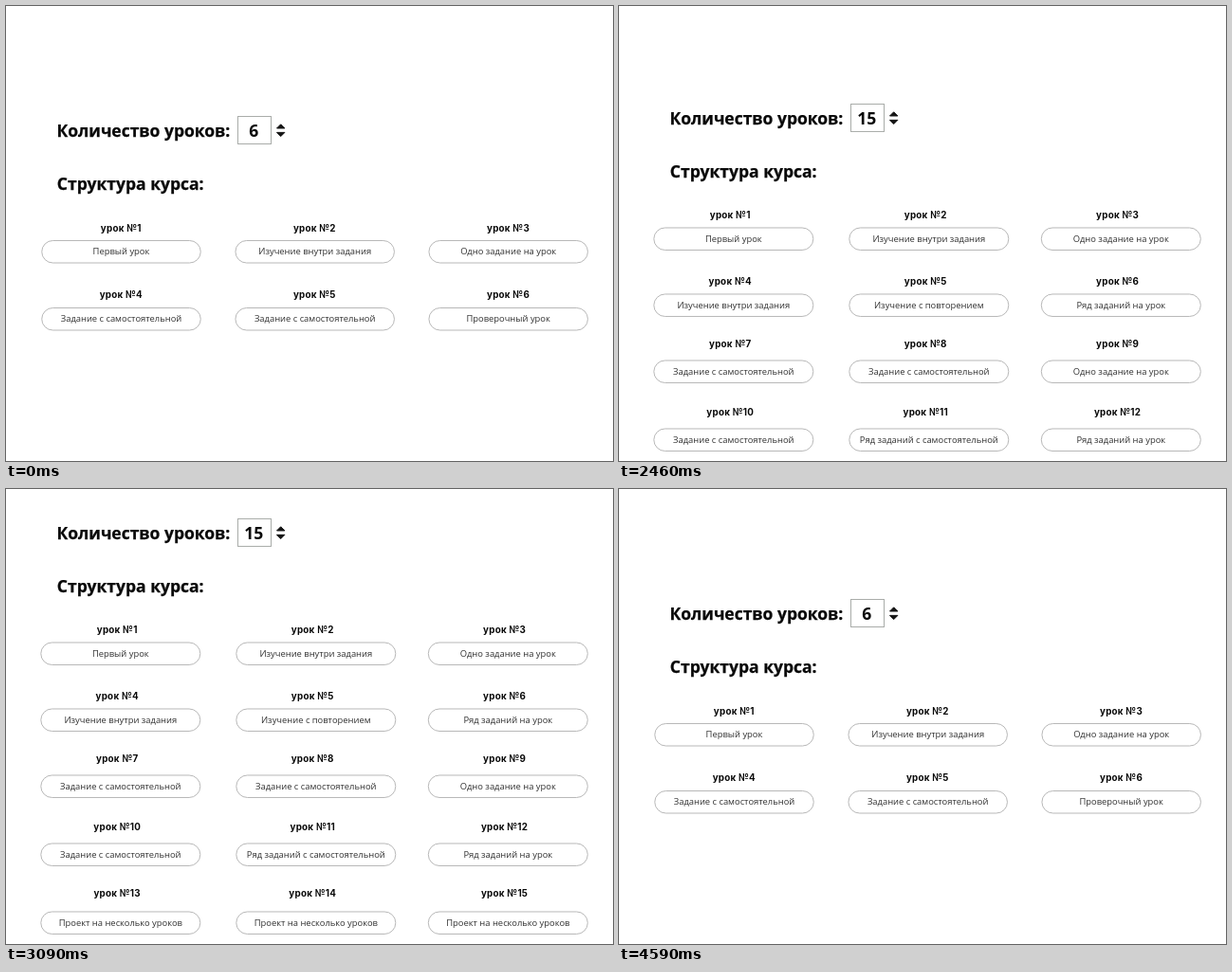
These frames come from a looping animation (640x480 px, 4.62 s). An HTML page:

```html
<!DOCTYPE html>
<html lang="ru">
<head>
<meta charset="utf-8">
<title>Структура курса</title>
<style>
  html, body { margin: 0; width: 100%; height: 100%; overflow: hidden; background: #fff; }
  svg { display: block; width: 640px; height: 480px; }
  text { fill: #080808; }
  .head { font: 700 17.5px "Open Sans", "Noto Sans", sans-serif; stroke: #080808; stroke-width: .25; }
  .num { font: 700 17.5px "Open Sans", "Noto Sans", sans-serif; text-anchor: middle; }
  .label { font: 700 9.8px Inter, "Open Sans", sans-serif; letter-spacing: .25px; text-anchor: middle; }
  .kind { font: 400 9.4px "Open Sans", "Noto Sans", sans-serif; text-anchor: middle; fill: #303030; }
  .pill { fill: #fff; stroke: #b8b8b8; stroke-width: 1; }
  .box { fill: #fff; stroke: #a9aca9; stroke-width: 1; }
  .arrow { fill: #151515; stroke: #151515; stroke-width: 1; stroke-linejoin: round; }
</style>
</head>
<body>
<svg id="stage" viewBox="0 0 640 480"></svg>
<script>
const LOOP = 4620, TICK = 30;
const FADE_EMPTY = [440, 940], FADE_FULL = [1740, 2240], FADE_BACK = [4080, 4570];
const SCROLL = [2346, 3186], SCROLL_BY = 96;

const FIRST = 'Первый урок';
const STUDY = 'Изучение внутри задания';
const REPEAT = 'Изучение с повторением';
const ONE = 'Одно задание на урок';
const SELF = 'Задание с самостоятельной';
const ROW = 'Ряд заданий на урок';
const ROW_SELF = 'Ряд заданий с самостоятельной';
const CHECK = 'Проверочный урок';
const PROJECT = 'Проект на несколько уроков';

const stage = document.getElementById('stage');

function add(parent, tag, attrs, text) {
  const el = document.createElementNS('http://www.w3.org/2000/svg', tag);
  for (const key in attrs) el.setAttribute(key, attrs[key]);
  if (text) el.textContent = text;
  parent.appendChild(el);
  return el;
}

// A slide is a white sheet with the heading and a movable content group.
function slide(count) {
  const sheet = add(stage, 'g', {});
  add(sheet, 'rect', { width: 640, height: 480, fill: '#fff' });
  const body = add(sheet, 'g', {});
  add(body, 'text', { class: 'head', x: 53.4, y: 137.6 }, 'Количество уроков:');
  add(body, 'text', { class: 'head', x: 53.8, y: 194.4 }, 'Структура курса:');
  add(body, 'rect', { class: 'box', x: 244.5, y: 116.5, width: 35, height: 29 });
  add(body, 'text', { class: 'num', x: 261.3, y: 137.8 }, count);
  add(body, 'path', { class: 'arrow', d: 'M285.5 129L289.7 124.8L293.9 129ZM285.5 133.4L289.7 137.6L293.9 133.4Z' });
  return { sheet, body };
}

// rows: [label y, pill y]; labelX, pillX: column centres
function lessons(body, kinds, rows, labelX, pillX, width) {
  kinds.forEach((kind, i) => {
    const col = i % 3, [labelY, pillY] = rows[Math.floor(i / 3)];
    const x = pillX[col];
    add(body, 'text', { class: 'label', x: labelX[col], y: labelY + 3.2 }, 'урок №' + (i + 1));
    add(body, 'rect', { class: 'pill', x: x - width / 2, y: pillY - 11.5, width, height: 23.5, rx: 11.7 });
    add(body, 'text', { class: 'kind', x, y: pillY + 3.2 }, kind);
  });
}

const start = slide('6');
lessons(start.body, [FIRST, STUDY, ONE, SELF, SELF, CHECK],
  [[235, 259], [305, 330]], [121.3, 325.3, 529.5], [121.5, 325.7, 529.7], 167.5);

const empty = slide('15');

const full = slide('15');
lessons(full.body,
  [FIRST, STUDY, ONE, STUDY, REPEAT, ROW, SELF, SELF, ONE, SELF, ROW_SELF, ROW, PROJECT, PROJECT, PROJECT],
  [[234, 258.5], [304, 328.5], [370, 398.5], [442, 470.5], [512, 542.5]],
  [117.2, 323.2, 525.6], [120.8, 326.8, 529.3], 168);

const ramp = (t, [from, to]) => Math.min(1, Math.max(0, (t - from) / (to - from)));

function show(layer, alpha) {
  layer.sheet.setAttribute('opacity', alpha);
  layer.sheet.setAttribute('display', alpha > 0 ? 'inline' : 'none');
}

function draw(now) {
  const t = Math.floor((now % LOOP) / TICK) * TICK;
  show(empty, t < SCROLL[0] ? ramp(t, FADE_EMPTY) : 0);
  show(full, ramp(t, FADE_FULL) * (1 - ramp(t, FADE_BACK)));
  full.body.setAttribute('transform', `translate(0 ${-SCROLL_BY * ramp(t, SCROLL)})`);
}

const origin = performance.now();
function frame() {
  draw(performance.now() - origin);
  requestAnimationFrame(frame);
}
frame();
</script>
</body>
</html>
```
